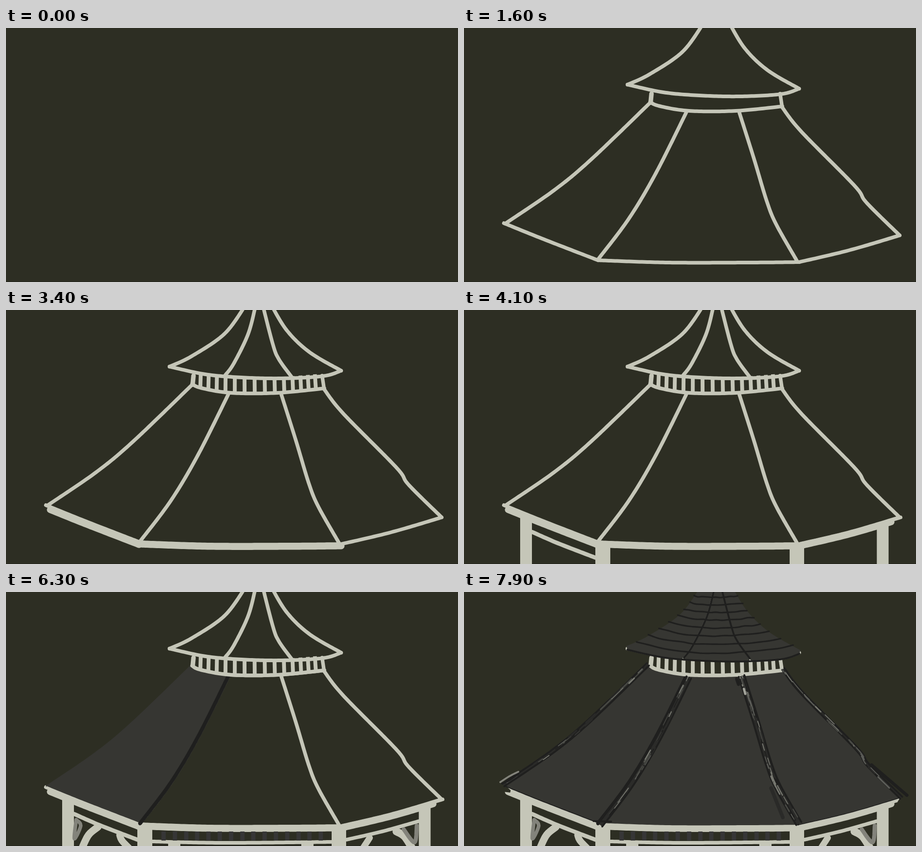
Animation of 998x561 px, one loop 8 s. Source, as an HTML page with a canvas:

```html
<!DOCTYPE html>
<html lang="en">
<head>
<meta charset="utf-8">
<title>Pavilion sketch</title>
<style>
html, body { margin: 0; width: 100%; height: 100%; overflow: hidden; background: #2d2e23; }
canvas { display: block; }
</style>
</head>
<body>
<canvas id="c" width="998" height="561"></canvas>
<script>
const g = document.getElementById('c').getContext('2d');
const BG = '#2d2e23', CREAM = '#c5c6b8', SLATE = '#363632', DARK = '#1f1f1e', GREY = '#83837b';
const LOOP = 8000, STEP = 100;
const scene = [];
let now = 0;

function random(seed) {
  return () => (seed = (seed * 16807) % 2147483647) / 2147483647;
}

// Catmull-Rom curve through a few key points
function curve(s) {
  const p = s.split(' ').map(q => q.split(',').map(Number)), out = [];
  for (let i = 0; i < p.length - 1; i++) {
    const b = p[i], c = p[i + 1], a = p[i - 1] || b, d = p[i + 2] || c;
    const n = Math.max(2, Math.ceil(Math.hypot(c[0] - b[0], c[1] - b[1]) / 5));
    for (let k = 0; k < n; k++) {
      const u = k / n;
      out.push([0, 1].map(j => 0.5 * (2 * b[j] + (c[j] - a[j]) * u +
        (2 * a[j] - 5 * b[j] + 4 * c[j] - d[j]) * u * u +
        (3 * b[j] - a[j] - 3 * c[j] + d[j]) * u * u * u)));
    }
  }
  out.push(p[p.length - 1]);
  return out;
}

// Parallel curve; positive d lies to the right of the direction of travel
function shift(pts, d) {
  return pts.map((p, i) => {
    const a = pts[Math.max(0, i - 1)], b = pts[Math.min(pts.length - 1, i + 1)];
    const dx = b[0] - a[0], dy = b[1] - a[1], l = Math.hypot(dx, dy) || 1;
    return [p[0] - dy / l * d, p[1] + dx / l * d];
  });
}

const part = (pts, from, to) => pts.slice(Math.round(pts.length * from), Math.round(pts.length * to));
const between = (pts, x0, x1) => pts.filter(p => p[0] >= x0 && p[0] <= x1);
const back = pts => [...pts].reverse();
const progress = (t0, t1) => Math.max(0, Math.min(1, (now - t0 + STEP) / (t1 - t0 + STEP)));

function trace(pts) {
  g.beginPath();
  pts.forEach(p => g.lineTo(p[0], p[1]));
}

function line(pts, color, w, cap = 'round') {
  g.strokeStyle = color;
  g.lineWidth = w;
  g.lineCap = cap;
  g.lineJoin = 'round';
  trace(pts);
  g.stroke();
}

// A stroke that grows from t0 to t1
function ink(path, color, w, t0, t1 = t0, cap) {
  const pts = typeof path === 'string' ? curve(path) : path;
  scene.push(() => {
    const p = progress(t0, t1);
    if (p > 0) line(pts.slice(0, Math.max(2, Math.ceil(pts.length * p))), color, w, cap);
  });
}

function fill(color, t, ...edges) {
  const pts = edges.flat();
  scene.push(() => {
    if (now < t) return;
    g.fillStyle = color;
    trace(pts);
    g.fill();
  });
}

// Ridge cap: dark edges with loose highlights between them
function ridge(pts, w, count, seed, t0, t1) {
  const rnd = random(seed);
  const tones = ['#5c5d58', '#474843', '#2a2a28', '#777870', DARK];
  const marks = Array.from({ length: count }, () => ({
    at: Math.floor(rnd() * (pts.length - 8)), len: 3 + Math.floor(rnd() * 5),
    off: (rnd() - 0.5) * w * 0.6, tone: tones[Math.floor(rnd() * 5)], w: 1.5 + rnd() * 2
  }));
  scene.push(() => {
    const p = progress(t0, t1);
    if (!p) return;
    const n = Math.max(2, Math.ceil(pts.length * p)), done = pts.slice(0, n);
    line(done, '#2b2b29', w, 'butt');
    for (const side of [-1, 1]) line(shift(done, side * (w / 2 - 2)), DARK, 4);
    for (const m of marks) if (m.at + m.len < n)
      line(shift(pts.slice(m.at, m.at + m.len), m.off), m.tone, m.w);
  });
}

// Shared skeleton of the roof
const hipL = curve('411,165 280,291 198,359 91,432');
const hipR = curve('701,173 744,228 862,348 889,386 962,458');
const ribL = curve('491,186 424,320 364,421 296,511');
const ribR = curve('608,187 640,288 669,384 690,435 735,514');
const eaveL = curve('88,431 172,465 296,513');
const eaveM = curve('296,513 450,518 630,518 740,517');
const eaveR = curve('740,517 850,491 962,458');
const collar = curve('411,163 430,172 497,183 600,183 703,173');
const capL = curve('531,-14 483,52 410,102 361,125');
const capR = curve('584,-14 620,45 670,93 740,134');
const capRibL = curve('552,-14 535,52 503,118 484,144');
const capRibR = curve('566,-14 589,75 602,108 630,147');
const capEave = curve('361,125 440,142 520,149 610,151 700,146 740,134');

// Outline
[eaveL, eaveM, eaveR, hipL, hipR, ribL, ribR].forEach((c, i) => ink(c, CREAM, 8, 100 + i * STEP));
ink(collar, CREAM, 8, 800, 900);
ink(capEave, CREAM, 8, 1000, 1200);
ink(back(capL), CREAM, 8, 1300, 1400);
ink(back(capR), CREAM, 8, 1400, 1500);
ink('414,145 412,165', CREAM, 10, 1600);
ink('698,145 702,172', CREAM, 8, 1600);
ink(capRibL, CREAM, 8, 1700);
ink(capRibR, CREAM, 8, 1800);

// Balusters, a little wider apart in the middle
for (let i = 0; i < 14; i++) {
  const u = i / 13;
  const x = 430 + 252 * u - 6 * Math.sin(2 * Math.PI * u) + 4 * Math.sin(Math.PI * u);
  const t = i < 9 ? 1900 + i * STEP : 2800 + Math.floor((i - 9) / 2) * STEP;
  ink(`${x},${142 + 6 * Math.sin(Math.PI * u)} ${x - 1 + 3 * u},${172 + 10 * Math.sin(Math.PI * u)}`, CREAM, 8.5, t, t, 'butt');
}

// Eave boards
ink(shift(part(eaveL, 0.08, 1), 6), CREAM, 14, 3100, 3200);
ink(shift(eaveM, 4), CREAM, 15, 3300, 3400);
ink(shift(part(eaveR, 0, 0.88), 4), CREAM, 15, 3500);
ink('940,465 964,458', CREAM, 8, 3500);

// Posts, rails and brackets
[[137, 455, 26], [306.5, 514, 33], [735, 514, 32], [924.5, 470, 26]].forEach(([x, y, w], i) =>
  ink(`${x},${y} ${x},565`, CREAM, w, 3600 + i * STEP, 3700 + i * STEP, 'butt'));
ink('150,490 207,515 290,547', CREAM, 9, 4100);
ink('323,551 480,554 720,552', CREAM, 8, 4200);
ink('752,547 830,529 912,506', CREAM, 8, 4300);
ink('203,519 182,537 166,570', CREAM, 16, 4400);
ink('251,537 256,549 274,568', CREAM, 15, 4400);
ink('803,543 788,566', CREAM, 14, 4500);
ink('862,529 880,540 898,568', CREAM, 17, 4500);
for (const x of [358, 652]) ink(`${x},559 ${x + 27},559`, CREAM, 9, 4500, 4500, 'butt');
ink('155,503 165,516 151,545 155,503', GREY, 8, 4500);
ink('878,524 902,553 907,516', GREY, 9, 4600);

// Slats behind the middle rail
for (let i = 0; i < 15; i++) {
  const x = Math.round(348 + i * 24.8);
  ink(`${x},529 ${x},549`, '#363636', 9.5, 4800 + Math.floor((i + 1) / 2.4) * STEP, undefined, 'butt');
}

// Main panels
const slateL = shift(hipL, 4), slateR = shift(hipR, -4);
const [rimL, rimM, rimR] = [eaveL, eaveM, eaveR].map(c => shift(c, -3));
ink(slateL, SLATE, 2, 5600, 5800);
ink(shift(rimL, -1), SLATE, 2, 5900);
fill(SLATE, 6000, slateL, rimL, back(ribL), back(collar.slice(0, 18)));
fill(SLATE, 6400, ribL, rimM, back(ribR));
fill(SLATE, 6600, ribR, rimR, back(slateR));
ink(ribL, DARK, 8.5, 6100, 6300);
ink(shift(ribR, -3), DARK, 6, 6700);
ink(collar, CREAM, 8, 6000);

// Upper panels
const topL = shift(capL, 6), topR = shift(capR, -6), rim = shift(capEave, 2);
fill(SLATE, 6800, topL, between(rim, 0, 482), back(capRibL));
fill(SLATE, 6800, topR, back(between(rim, 632, 998)), back(capRibR));
fill(SLATE, 6900, capRibL, between(rim, 482, 632), back(capRibR));
ink(shift(capRibL, -2), CREAM, 2, 6900);
ink(shift(capRibR, -1), CREAM, 2, 6900);

// Ridge caps
fill(BG, 7000, [[78, 422], [91, 427], [103, 438], [102, 443], [78, 440]]);
fill(BG, 7000, [[963, 454], [974, 454], [974, 466], [957, 464]]);
ink(rimL, DARK, 2, 7000);
ink(rimR, DARK, 1.5, 7000);
ridge(shift(hipL, 7), 11, 26, 71, 7000, 7200);
ink('120,397 100,407 80,420', GREY, 4, 7200);
ink('120,402 100,416 84,423', DARK, 4, 7200);
ridge(shift(ribL, -6), 15, 40, 39, 7300, 7400);
ink('286,506 325,507', DARK, 4, 7400);
ridge(shift(ribR, -5), 17, 60, 915, 7400, 7500);
ink('602,192 606,204', DARK, 7, 7500);
ink('678,433 704,498', '#2a2a28', 8, 7500);
ink('618,214 621,225', '#a3a49b', 5, 7500);
ridge(shift(hipR, -5), 10, 28, 528, 7500, 7600);
ink('900,382 978,449', DARK, 7, 7600);

// Shingle courses sag between the two edges
const edgeX = (pts, y) => pts.find(p => p[1] >= y)[0];
const rnd = random(4021);
for (let i = 0; i < 8; i++) {
  const l = 9 + 14.4 * i, m = 12 + 16 * i + 0.22 * i * i, r = 9 + 15.6 * i;
  const x0 = edgeX(topL, l), x1 = edgeX(topR, r), row = [];
  for (let k = 0; k <= 12; k++) {
    const v = k / 6 - 1;
    row.push(`${x0 + (x1 - x0) * k / 12},${m + ((v < 0 ? l : r) - m) * v * v + (rnd() - 0.5) * 2.4}`);
  }
  ink(row.join(' '), DARK, 3.4, 7900 - Math.floor(i / 2.7) * STEP);
}
ink(shift(capRibL, -2), DARK, 4, 7200);
ink(shift(capRibR, -1), DARK, 4, 7200);
ink(shift(capEave, 2.5), DARK, 4, 7300);

function draw() {
  g.fillStyle = BG;
  g.fillRect(0, 0, 998, 561);
  g.fillStyle = '#24251c';
  g.fillRect(0, 560, 998, 1);
  for (const item of scene) item();
}

const start = performance.now();
let last = -1;
function frame() {
  now = Math.floor(((performance.now() - start) % LOOP) / STEP) * STEP;
  if (now !== last) {
    last = now;
    draw();
  }
  requestAnimationFrame(frame);
}
frame();
</script>
</body>
</html>
```
